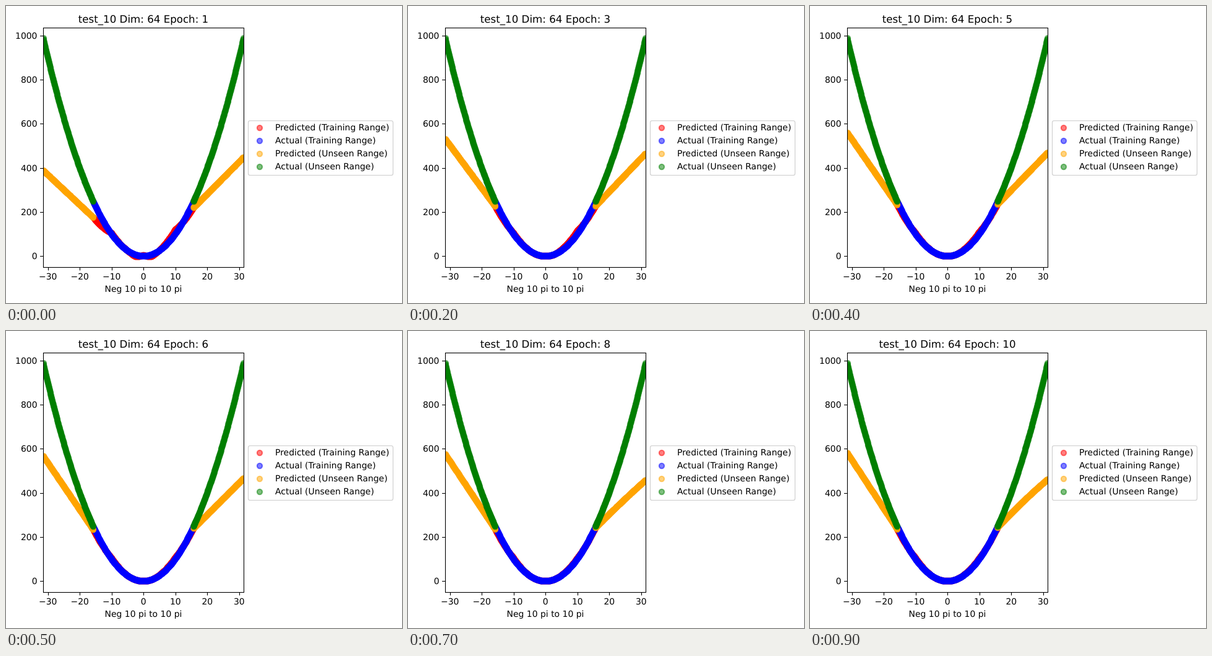
An HTML page with a canvas that plays this animation: 640 by 480 pixels, repeating every 1 s.

```html
<!DOCTYPE html>
<html lang="en">
<head>
<meta charset="utf-8">
<title>Training progress</title>
<style>
  html, body { margin: 0; width: 100%; height: 100%; overflow: hidden; background: #fff; }
  canvas, svg { position: absolute; left: 0; top: 0; width: 640px; height: 480px; }
  text { font: 13.95px "DejaVu Sans", sans-serif; fill: #000; text-rendering: geometricPrecision; }
  #title { font-size: 16.67px; }
  .mid { text-anchor: middle; }
  .end { text-anchor: end; }
  .line { fill: none; stroke: #000; stroke-width: 1.1; }
</style>
</head>
<body>
<canvas id="plot" width="640" height="480"></canvas>
<svg id="chart" viewBox="0 0 640 480">
  <rect class="line" x="60.5" y="35.5" width="324" height="387"/>
  <rect x="391.5" y="185.5" width="234" height="88" rx="2.8" fill="#fff" stroke="#ccc" stroke-width="1.1"/>
  <text id="title" class="mid" x="222" y="27"></text>
  <text class="mid" x="222" y="462">Neg 10 pi to 10 pi</text>
</svg>
<script>
const chart = document.getElementById('chart');
const title = document.getElementById('title');
const ctx = document.getElementById('plot').getContext('2d');

const HALF = 5 * Math.PI, FULL = 10 * Math.PI;
const px = x => 222.3 + x * 5.15;
const py = y => 404.4 - y * 0.3566;
const snap = v => Math.round(v) + 0.5;
const square = x => x * x;
const lerp = (a, b, k) => a + (b - a) * k;

// The model's curve after n epochs: x² plus an error that shrinks
// inside the training range, nearly straight arms outside it
function model(n) {
  const wobble = 4 / (n * n);
  const errors = [
    [-HALF, -10 - 62 / n ** 1.5],
    [-10, 5],
    [-5, 0],
    [-2.5, -2 * wobble],
    [0, wobble],
    [2.5, -2 * wobble],
    [10, Math.max(4, 22 - 2.5 * n)],
    [HALF, Math.min(-5, 4 * n - 32)]
  ];
  const leftEnd = 602 - 214 / n;
  const rightEnd = 463 + 6 * Math.sin((n - 2.5) * Math.PI / 4) - 10 / n ** 4;
  const bow = Math.max(0, n - 6) * 1.6;

  function inside(x) {
    let i = 1;
    while (i < errors.length - 1 && x > errors[i][0]) i++;
    const [x0, e0] = errors[i - 1], [x1, e1] = errors[i];
    return x * x + lerp(e0, e1, (x - x0) / (x1 - x0));
  }

  return x => {
    const u = (Math.abs(x) - HALF) / HALF;
    if (u <= 0) return inside(x);
    if (x < 0) return lerp(inside(-HALF), leftEnd, u);
    return lerp(inside(HALF), rightEnd, u) + bow * 4 * u * (1 - u);
  };
}

// Half-transparent marker: fill and outline overlap in a darker ring
function dot(x, y) {
  ctx.beginPath();
  ctx.arc(x, y, 4.17, 0, 2 * Math.PI);
  ctx.fill();
  ctx.stroke();
}

function scatter(f, from, to, count, color) {
  ctx.fillStyle = ctx.strokeStyle = color;
  for (let i = 0; i <= count; i++) {
    const x = lerp(from, to, i / count);
    dot(Math.round(px(x)), Math.round(py(f(x))));
  }
}

function add(tag, attrs, text) {
  const el = document.createElementNS('http://www.w3.org/2000/svg', tag);
  for (const k in attrs) el.setAttribute(k, attrs[k]);
  if (text !== undefined) el.textContent = text;
  chart.append(el);
}

for (let v = -30; v <= 30; v += 10) {
  add('path', { class: 'line', d: `M${snap(px(v))} 422v5.4` });
  add('text', { class: 'mid', x: px(v), y: 442 }, String(v).replace('-', '\u2212'));
}

for (let v = 0; v <= 1000; v += 200) {
  const y = snap(py(v));
  add('path', { class: 'line', d: `M60 ${y}h-4.9` });
  add('text', { class: 'end', x: 50.5, y: y + 4.5 }, v);
}

const LEGEND = [
  ['Predicted (Training Range)', 'red'],
  ['Actual (Training Range)', 'blue'],
  ['Predicted (Unseen Range)', 'orange'],
  ['Actual (Unseen Range)', 'green']
];
LEGEND.forEach(([name, color], i) => {
  const y = 197 + i * 21;
  add('text', { x: 435, y: y + 4 }, name);
  add('circle', {
    cx: 410, cy: y, r: 4.17, fill: color, stroke: color,
    'stroke-width': 2.08, 'fill-opacity': 0.5, 'stroke-opacity': 0.5
  });
});

function draw(epoch) {
  const guess = model(epoch);
  title.textContent = `test_10 Dim: 64 Epoch: ${epoch}`;

  ctx.clearRect(0, 0, 640, 480);
  ctx.save();
  ctx.beginPath();
  ctx.rect(60, 35, 324, 387);
  ctx.clip();
  ctx.globalAlpha = 0.5;
  ctx.lineWidth = 2.08;
  scatter(guess, -HALF, HALF, 500, 'red');
  scatter(square, -HALF, HALF, 500, 'blue');
  for (const [f, color] of [[guess, 'orange'], [square, 'green']]) {
    scatter(f, -FULL, -HALF, 250, color);
    scatter(f, FULL, HALF, 250, color);
  }
  ctx.restore();
}

const start = performance.now();
let shown = 0;
function tick() {
  const epoch = Math.floor((performance.now() - start) % 1000 / 100) + 1;
  if (epoch !== shown) draw(shown = epoch);
  requestAnimationFrame(tick);
}
tick();
</script>
</body>
</html>
```
